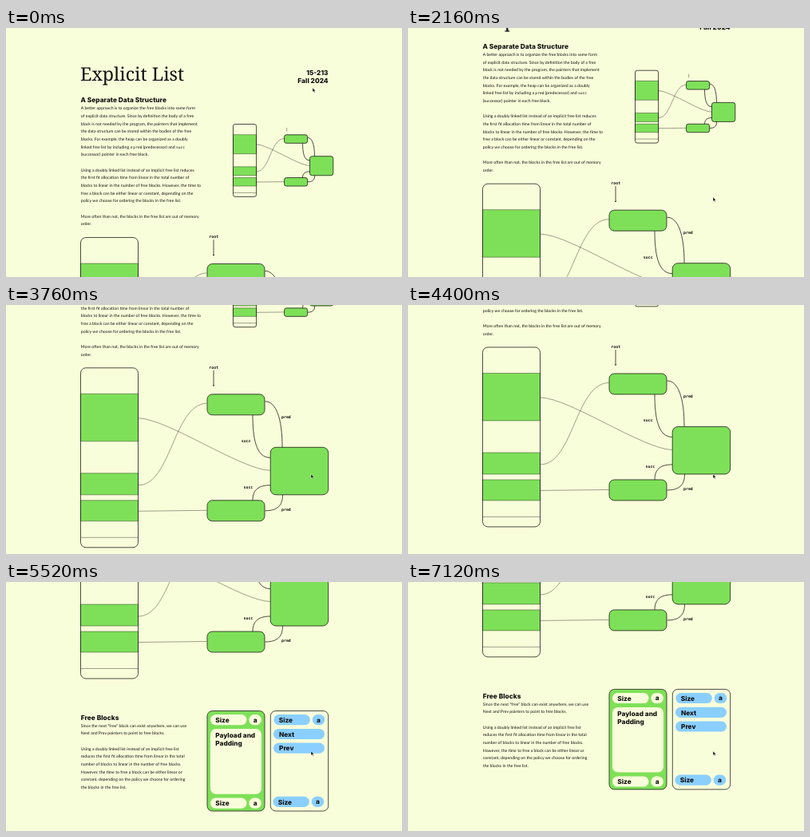
Animation of 496x312 px, one loop 7440 ms. Source, as an HTML page:

```html
<!DOCTYPE html>
<html lang="en">
<head>
<meta charset="utf-8">
<title>Explicit List</title>
<style>
  html, body { margin: 0; width: 100%; height: 100%; overflow: hidden; background: #f9feda; }
  svg { display: block; width: 496px; height: 312px; }
  text { fill: #111; text-rendering: geometricPrecision; white-space: pre; }
  .title { font: 23.2px "Noto Serif", serif; }
  .head { font: 800 8.35px Inter, sans-serif; }
  .card { font: 800 8.25px Inter, sans-serif; }
  .body { font: 5.2px Lato, sans-serif; }
  .code { font: 700 4.9px "DejaVu Sans Mono", monospace; }
  .body .code { font-weight: 400; font-size: 4.6px; }
  .line, .thin, .box { stroke: #111; fill: none; vector-effect: non-scaling-stroke; }
  .line, .box { stroke-width: .75; }
  .thin { stroke-width: .4; }
  .green { fill: #7ee058; }
  .blue { fill: #8acfff; }
  .cream { fill: #f9feda; }
</style>
</head>
<body>
<svg viewBox="0 0 496 312">
  <defs>
    <g id="heap">
      <path class="thin green" d="M93.5 295H165.5V354.5H93.5ZM93.5 394.5H165.5V421.5H93.5ZM93.5 428.5H165.5V454.5H93.5Z"/>
      <path class="thin" d="M93.5 475H165.5"/>
      <rect class="box" x="93.5" y="262.5" width="72" height="225" rx="6.5"/>
      <path class="thin" d="M166 325.5C202 326 295 390.5 331 391M166 409.5C207 409 210 307.5 251.5 307M166 442L251.5 441"/>
      <path class="line" d="M324.5 304.5C338 304.5 346 325 346 362M309 321.5C309 350 313 375 331 375M331 409.5C318 409.5 309 414 309 428.5M346.5 421.5C346.5 435 340 441.5 324.5 441.5"/>
      <rect class="box green" x="252" y="295.5" width="72" height="26" rx="6.5"/>
      <rect class="box green" x="331.2" y="362" width="72.5" height="59.5" rx="7"/>
      <rect class="box green" x="252" y="428.5" width="72" height="26" rx="6.5"/>
    </g>
  </defs>
  <g id="page">
    <use href="#heap"/>
    <use href="#heap" transform="translate(284.5 120.5) scale(.404) translate(-93.5 -262.5)"/>
    <path class="thin" d="M351.7 125V129.5"/>
    <path class="line" d="M260 265.5V285M259.2 284L260 285.2L260.8 284"/>
  </g>
  <path id="cursor" d="M0 0V5.2L1.3 4.1L2.2 6.1L3.1 5.7L2.2 3.8H3.8Z" fill="#111" stroke="#fff" stroke-width=".4"/>
</svg>
<script>
const page = document.getElementById('page');
const cursor = document.getElementById('cursor');

function add(tag, attrs, content = '') {
  const el = document.createElementNS('http://www.w3.org/2000/svg', tag);
  for (const k in attrs) el.setAttribute(k, attrs[k]);
  if (content) el.innerHTML = content;
  page.append(el);
}
const label = (cls, x, y, s, anchor = 'start') =>
  add('text', { class: cls, x, y, 'text-anchor': anchor }, s);
const rect = (cls, x, y, width, height, rx) =>
  add('rect', { class: cls, x, y, width, height, rx });
const pill = (cls, x, y, w) => rect(cls, x, y, w, 13.2, 6.6);
const lines = (y, rows) => rows.forEach((s, i) => s && label('body', 93.8, y + i * 9.67, s));
const mono = s => `<tspan class="code">${s}</tspan>`;

label('title', 93, 66, 'Explicit List');
label('head', 403.6, 59.1, '15-213', 'end');
label('head', 403.6, 69.1, 'Fall 2024', 'end');
label('head', 93.5, 93, 'A Separate Data Structure');
lines(102.3, [
  'A better approach is to organize the free blocks into some form',
  'of explicit data structure. Since by definition the body of a free',
  'block is not needed by the program, the pointers that implement',
  'the data structure can be stored within the bodies of the free',
  'blocks. For example, the heap can be organized as a doubly',
  `linked free list by including a ${mono('pred')} (predecessor) and ${mono('succ')}`,
  '(successor) pointer in each free block.',
  '',
  'Using a doubly linked list instead of an implicit free list reduces',
  'the first fit allocation time from linear in the total number of',
  'blocks to linear in the number of free blocks. However, the time to',
  'free a block can be either linear or constant, depending on the',
  'policy we choose for ordering the blocks in the free list.',
  '',
  'More often than not, the blocks in the free list are out of memory',
  'order.'
]);

label('code', 254.3, 263.3, 'root');
label('code', 345, 325.8, 'pred');
label('code', 345, 441.8, 'pred');
label('code', 294.8, 356, 'succ');
label('code', 297.5, 413.3, 'succ');

label('head', 93.8, 539.3, 'Free Blocks');
lines(548.3, [
  'Since the next “free” block can exist anywhere, we can use',
  'Next and Prev pointers to point to free blocks.',
  '',
  'Using a doubly linked list instead of an implicit free list',
  'reduces the first fit allocation time from linear in the total',
  'number of blocks to linear in the number of free blocks.',
  'However, the time to free a block can be either linear or',
  'constant, depending on the policy we choose for ordering',
  'the blocks in the free list.'
]);

// A "Size | a" row of a block card
function sizeRow(cls, x, y) {
  pill(cls, x, y, 45.5);
  pill(cls, x + 48.3, y, 15.6);
  label('card', x + 6.3, y + 9.8, 'Size');
  label('card', x + 56.1, y + 9.6, 'a', 'middle');
}
rect('box green', 252, 528, 72, 125.5, 6.5);
rect('box', 331.3, 528, 72.4, 125.5, 6.5);
sizeRow('cream', 256, 532.5);
sizeRow('cream', 256, 637);
rect('cream', 256, 550.5, 64, 81.7, 7);
label('card', 262.3, 561.2, 'Payload and');
label('card', 262.3, 571.2, 'Padding');
sizeRow('blue', 335.4, 532.5);
sizeRow('blue', 334.4, 635.2);
pill('blue', 335, 550.4, 64);
pill('blue', 335, 568, 64);
label('card', 342, 560.3, 'Next');
label('card', 342, 577.8, 'Prev');

const LOOP = 7440, STEP = 80;
const scrollKeys = [
  [0, 0], [1200, 0], [2160, 67.3], [3120, 122.2], [3760, 183.7], [3840, 184], [4080, 184],
  [4800, 269.2], [5520, 366.5], [5680, 367], [5920, 367], [6720, 393.6], [LOOP, 393.6]
];
const cursorKeys = [[0, 75], [80, 75], [800, 212], [LOOP, 212]];

// Smooth monotone curve through [time, value] keys
function curve(keys) {
  const rate = keys.slice(1).map((k, i) => (k[1] - keys[i][1]) / (k[0] - keys[i][0]));
  const slope = keys.map((_, i) => {
    const a = rate[i - 1] || 0, b = rate[i] || 0;
    return a * b > 0 ? 2 * a * b / (a + b) : 0;
  });
  return t => {
    let i = 0;
    while (i < keys.length - 2 && t >= keys[i + 1][0]) i++;
    const [t0, y0] = keys[i], [t1, y1] = keys[i + 1];
    const d = t1 - t0, u = (t - t0) / d, v = 1 - u;
    return v * v * (1 + 2 * u) * y0 + u * u * (3 - 2 * u) * y1
      + d * u * v * (v * slope[i] - u * slope[i + 1]);
  };
}
const scrollAt = curve(scrollKeys), cursorAt = curve(cursorKeys);

function draw(ms) {
  const t = Math.floor((ms % LOOP) / STEP) * STEP;
  const cy = cursorAt(t);
  page.setAttribute('transform', `translate(0 ${-scrollAt(t)})`);
  cursor.setAttribute('transform', `translate(${384 - 2 * (cy - 75) / 137} ${cy})`);
}
const start = performance.now();
function tick() {
  draw(performance.now() - start);
  requestAnimationFrame(tick);
}
tick();
</script>
</body>
</html>
```
